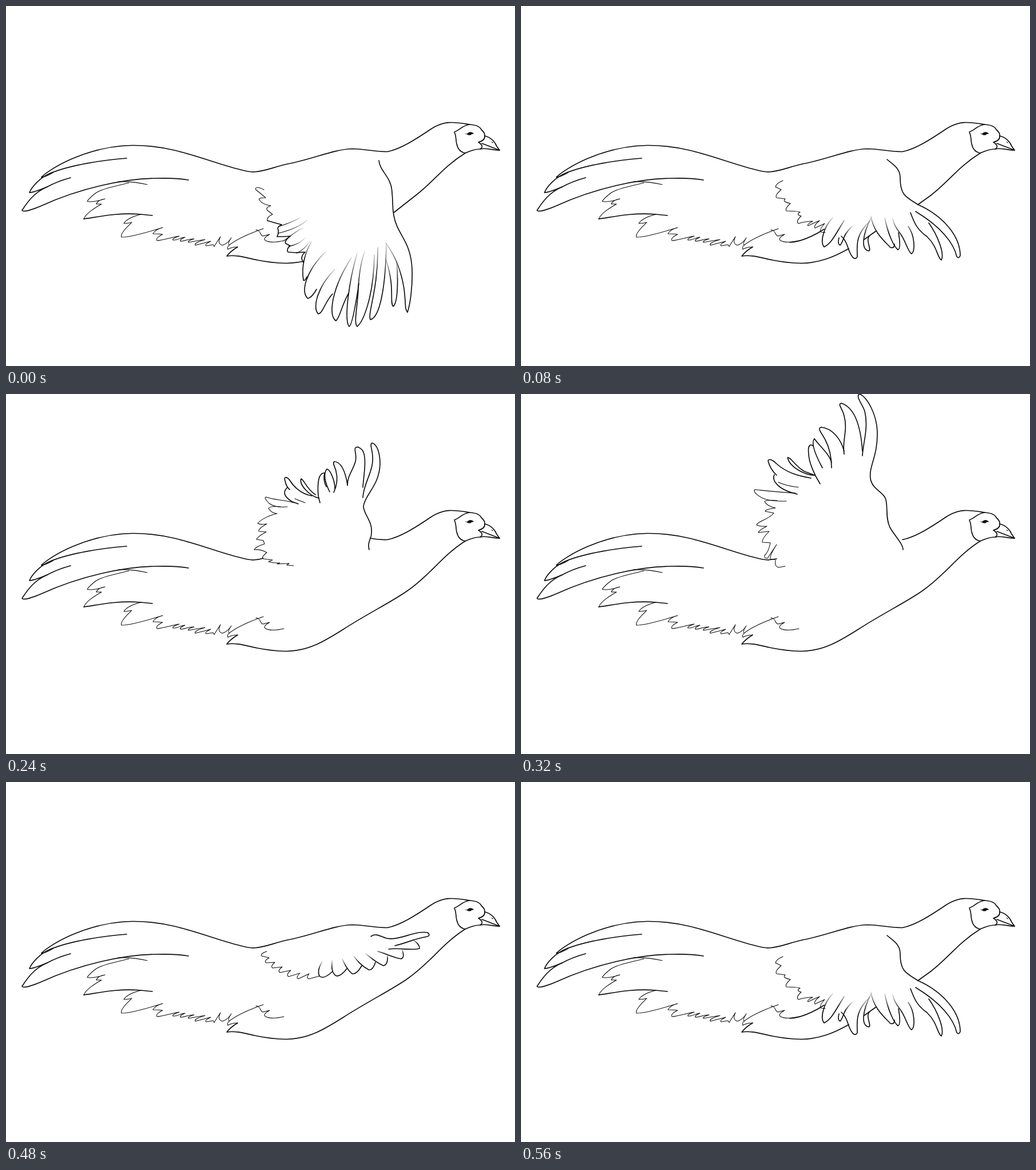
Animation, 890 px wide and 629 px high, one loop 640 ms. Source, as an HTML page without scripts:

```html
<!DOCTYPE html>
<html lang="en">
<head>
<meta charset="utf-8">
<title>Flying pheasant</title>
<style>
  html, body { margin: 0; width: 100%; height: 100%; overflow: hidden; background: #fff; }
  svg { display: block; width: 100%; height: 100%; }
  path { fill: none; stroke: #0b0b0b; stroke-width: 1.65; stroke-linecap: round; stroke-linejoin: round; }
  .thin path, path.thin { stroke-width: 1.05; }
  path.ink { fill: #0b0b0b; stroke-width: .3; }
  .feathers path { stroke: url(#fade-up); }
  path.hair { stroke: url(#fade-right); stroke-width: 1.05; }

  /* Eight equal beats: the wing rises for four and falls for four. */
  .pose { visibility: hidden; animation: 640ms step-end infinite; }
  .down { animation-name: down; }
  .low  { animation-name: low; }
  .mid  { animation-name: mid; }
  .high { animation-name: high; }
  .top  { animation-name: top; }
  .back { animation-name: back; }
  .belly { animation-name: belly; }
  @keyframes down { 0% { visibility: visible } 12.5%, 100% { visibility: hidden } }
  @keyframes low  { 0%, 25% { visibility: hidden } 12.5%, 87.5%, 100% { visibility: visible } }
  @keyframes mid  { 0%, 37.5%, 87.5%, 100% { visibility: hidden } 25%, 75% { visibility: visible } }
  @keyframes high { 0%, 50%, 75%, 100% { visibility: hidden } 37.5%, 62.5% { visibility: visible } }
  @keyframes top  { 0%, 62.5%, 100% { visibility: hidden } 50% { visibility: visible } }
  @keyframes back { 0%, 75%, 100% { visibility: visible } 37.5% { visibility: hidden } }
  @keyframes belly { 0%, 87.5%, 100% { visibility: hidden } 25% { visibility: visible } }
</style>
</head>
<body>
<svg viewBox="0 0 890 629">
  <!-- strokes thin out towards the root of a feather -->
  <linearGradient id="fade-up" x1="0" y1="0" x2="0" y2="1">
    <stop stop-color="#0b0b0b" stop-opacity=".15"/>
    <stop offset=".45" stop-color="#0b0b0b"/>
  </linearGradient>
  <linearGradient id="fade-right">
    <stop offset=".3" stop-color="#0b0b0b"/>
    <stop offset="1" stop-color="#0b0b0b" stop-opacity=".15"/>
  </linearGradient>

  <!-- tail -->
  <path d="M62 299C76 285 140 245 221 243.5C296 243 352 272 410 286Q422 289.5 432 290"/>
  <path d="M62 299Q68 299 82 291"/>
  <path d="M211 266C170 269 112 278 78 292C60 299 45 316 41 326Q48 326 72 316"/>
  <path d="M113 300C98 304 85 309 72 316C48 326 36 345 28 357C30 361 48 355 62 349C130 318 205 302 262 301Q296 300 319 304"/>
  <g class="thin">
    <path d="M247 312Q222 306 196 307"/>
    <path d="M215 309C190 315 170 319 158 326Q147 334 142 341Q150 344 173 337Q160 339 158 346L167 346C155 353 140 362 136 372"/>
  </g>
  <path d="M136 372C150 371 190 360 236 364L256 366"/>
  <path class="thin" d="M236 364Q212 370 206 380Q213 380 220 378C212 386 199 398 202 404C215 404 245 396 274 387Q260 391 257 398Q266 398 274 399Q261 405 264 410C275 409 290 404 303 402Q290 406 292 409C300 410 305 404 313 404Q303 408 305 411C313 411 320 406 329 407Q317 410 319 413Q335 410 348 408Q328 414 331 418Q347 414 358 411Q346 417 350 419L362 417L364 420"/>
  <path class="thin" d="M364 420L375 403Q369 415 378 418Q387 416 394 405Q387 415 390 418"/>

  <!-- leg feathers -->
  <path class="thin" d="M450 389C430 396 405 406 390 418Q386 422 388 425Q395 421 405 421"/>
  <path d="M405 421Q393 428 386 437C402 434 420 440 440 444Q465 449 490 449.5"/>
  <path class="thin" d="M437 391C447 393 443 400 449 402L461 399Q448 406 454 410Q464 415 486 410"/>

  <!-- neck and head -->
  <path d="M667 254.5C690 250 718 232 743 215C767 199 785 203 811 207C823 208 829 211 831 216Q838 222 837 227"/>
  <path d="M811 207C798 208 794 217 784 220C788 229 786 233 788 241Q791 255 803 257"/>
  <path d="M837 227C847 229 855 237 858 245L863 252C850 252 838 247 829 250Q818 250 803 257"/>
  <path d="M863 252L832 240M837 227Q838 235 826 238Q837 245 829 250"/>
  <path class="ink" d="M803 223Q807 224 809 221Q814 219 818 223Q814 223 812 225.5Q808 226 806 224Z"/>
  <path class="ink" d="M849 237l3 2l-2 0z"/>

  <!-- body outline hidden behind the wing in some poses -->
  <path class="pose back" d="M432 290C455 289 470 280 497 275C540 266 575 250 606 249.5C630 250 648 255 667 254.5"/>
  <path class="pose belly" d="M490 449.5C530 449 560 430 590 411C630 385 680 360 703 343C742 316 763 282 803 257"/>

  <g class="pose down">
    <path d="M490 449.5Q507 449 520 446M803 257C763 282 748 307 715 332L678 361"/>
    <path d="M652 270C654 290 674 298 675 326C677 345 675 350 678 366C684 400 708 410 710 460C711 490 707 520 702 535"/>
    <g class="feathers">
      <path d="M702 535C694 527 704 504 685 452Q677 432 664 414"/>
      <path d="M683 446C686 480 685 519 677 525C670 518 681 492 664 442"/>
      <path d="M665 414C664 490 654 544 637 548C632 536 651 495 650 422"/>
      <path d="M644 435C643 510 624 552 614 560C607 553 616 520 616 490Q619 450 627 430"/>
      <path d="M617 485C611 525 605 558 600 560C591 549 599 483 614 432"/>
      <path d="M599 502C586 525 584 544 577 550C562 541 571 490 604 440"/>
      <path d="M571 503C557 518 554 537 546 538C535 527 545 490 575 460"/>
      <path d="M543 495Q535 509 528 511C514 500 525 463 558 430"/>
      <path d="M526 473Q523 481 520 479C516 455 523 430 534 412"/>
    </g>
    <path class="thin" d="M451 321C441 315 434 317 437 321Q448 330 454 335Q440 335 443 339Q449 347 463 349Q453 352 457 357L466 364Q455 369 457 375"/>
    <path d="M457 375Q470 379 482 382Q473 386 476 391Q477 398 474 403Q488 403 497 402Q486 411 489 415L497 419Q490 424 493 430L507 431L523 430Q513 439 520 448"/>
    <path class="hair" d="M478 385Q500 378 514 370"/>
    <path class="hair" d="M476 397Q508 390 527 374"/>
    <path class="hair" d="M486 410L497 402Q510 392 519 388"/>
    <path class="hair" d="M494 420Q512 417 523 405"/>
    <path class="hair" d="M508 432Q523 425 531 411"/>
  </g>

  <g class="pose low">
    <path d="M490 449.5C523 449 548 438 573 424M600 408L621 393M803 257C763 282 748 307 715 332L694 347"/>
    <path d="M640 268C650 277 663 283 663 300C663 330 672 333 694 347C735 365 768 400 768 436Q766 442 762 438C757 415 735 386 690 359"/>
    <path d="M713 379C728 400 741 432 735 444C728 440 728 420 710 403C693 391 688 380 681 361"/>
    <g class="feathers">
      <path d="M677 385C688 400 690 427 683 433C676 429 673 410 662 396Q652 383 650 372"/>
      <path d="M660 396Q665 424 659 426C652 420 642 400 636 370"/>
      <path d="M653 416Q653 424 646 422C637 412 616 396 612 367"/>
      <path d="M609 402C602 410 614 426 608 428C594 425 597 400 612 370"/>
      <path d="M611 375C583 400 588 421 588 438Q586 443 581 440C570 429 574 415 560 402"/>
      <path d="M580 384C562 400 565 410 558 418Q553 416 556 405"/>
      <path d="M565 375C550 398 544 414 530 421C522 412 530 385 545 370"/>
    </g>
    <path class="thin" d="M458 305Q446 310 445 316L455 321Q443 331 447 335L462 337Q456 342 471 345Q461 354 464 358Q478 358 488 360Q480 365 490 367Q480 376 485 380Q499 376 510 376Q499 382 502 384Q514 378 522 375Q511 384 514 388L531 380Q521 391 524 395L532 396"/>
    <path d="M470 413C490 412 511 402 530 390"/>
  </g>

  <g class="pose mid">
    <path d="M638 270C646 263 655 270 665 273C688 278 714 259 737 263Q743 267 737 270C716 273 702 281 680 286"/>
    <g class="feathers">
      <path d="M711 275Q724 284 723 291C707 295 690 289 669 292"/>
      <path d="M692 292Q698 306 691 309C674 306 663 299 650 296"/>
      <path d="M667 304Q668 319 660 321C646 315 637 306 629 300"/>
      <path d="M646 315Q641 330 634 328C621 321 614 312 608 304"/>
      <path d="M622 321Q613 337 605 335C596 327 592 318 588 309"/>
      <path d="M596 326Q584 342 576 338C568 331 570 321 570 312"/>
      <path d="M571 331Q555 346 548 339C544 330 549 320 553 314"/>
    </g>
    <path class="thin" d="M456 296Q444 300 447 304L460 307Q450 313 455 316L470 315Q462 322 466 325L483 323Q474 330 479 333L498 329Q489 337 494 340L514 334Q506 342 511 344L530 335Q524 343 530 344L548 339"/>
  </g>

  <g class="pose high">
    <path d="M432 290Q441 290 450 287M637 252Q652 255 667 254.5"/>
    <path d="M635 272C631 258 640 252 639 242C641 222 625 210 625 196C628 175 653 160 654 122C654 102 648 87 640 85.5C634 90 645 101 640 125C636 145 625 160 624 181"/>
    <path d="M624 163C625 145 632 110 623 98Q615 90 611 94C608 98 614 105 611 118C606 135 597 142 597 160"/>
    <path d="M597 158C594 140 588 119 574 118C570 121 576 128 577 135Q582 153 573 172"/>
    <path d="M575 165C575 150 566 131 561 131C554 140 558 155 566 171"/>
    <path d="M557 138C547 137 544 154 546 178L549 190M557 139Q554 150 560 162"/>
    <path d="M547 182C530 178 512 158 516 148C522 151 525 165 541 176"/>
    <path d="M535 178C515 175 502 160 497 152C491 143 485 144 488 152Q490 162 496 167M492 163C483 172 487 180 500 188L511 192"/>
    <g class="thin">
      <path d="M523 190L505 183M504 190C490 185 465 185 455 180C450 180 456 187 460 191Q470 199 492 197"/>
      <path d="M480 197Q461 195 459 200Q464 208 474 209C462 211 446 219 440 226Q446 229 456 227Q441 235 442 240L455 241Q440 249 438 254L450 256L452 262Q436 267 434 272Q446 271 456 277Q445 286 450 288L466 290L459 293Q470 296 479 295L474 297L495 296L491 299L503 300"/>
    </g>
  </g>

  <g class="pose top">
    <path d="M432 290L447 288"/>
    <path d="M668 272C668 262 655 250 645 233C636 215 643 190 636 180C630 170 614 165 611 148C608 125 624 110 623 66C622 35 605 5 592 0C584 3 597 18 601 30C608 60 598 85 597 108"/>
    <path d="M597 100C595 70 588 25 560 16C553 18 562 25 565 38C572 65 561 80 565 105"/>
    <path d="M565 100C560 80 545 60 525 58C517 60 526 68 532 80C540 95 543 110 543 129"/>
    <path d="M543 120C540 105 520 89 513 78C507 85 514 105 527 129"/>
    <path d="M511 91C506 86 501 90 503 104C503 118 512 140 523 157"/>
    <path d="M514 142C498 142 470 129 466 111C472 110 478 125 495 135L514 142"/>
    <path d="M507 147C485 143 465 138 447 122C440 115 433 112 432 117Q436 132 447 142M443 141C438 150 448 167 483 175"/>
    <g class="thin">
      <path d="M485 163Q461 160 450 154M480 173C450 172 420 168 409 167C404 171 418 181 428 184Q445 188 464 187"/>
      <path d="M448 186Q426 185 426 188Q430 196 445 199Q426 202 427 205L442 208C434 219 412 223 412 229Q419 232 430 231Q416 238 415 242L434 240Q421 253 422 259L436 260Q433 276 426 282Q425 288 431 287L447 263Q434 283 436 289Q445 288 445 291Q443 301 450 303L462 301"/>
    </g>
  </g>
</svg>
</body>
</html>
```
